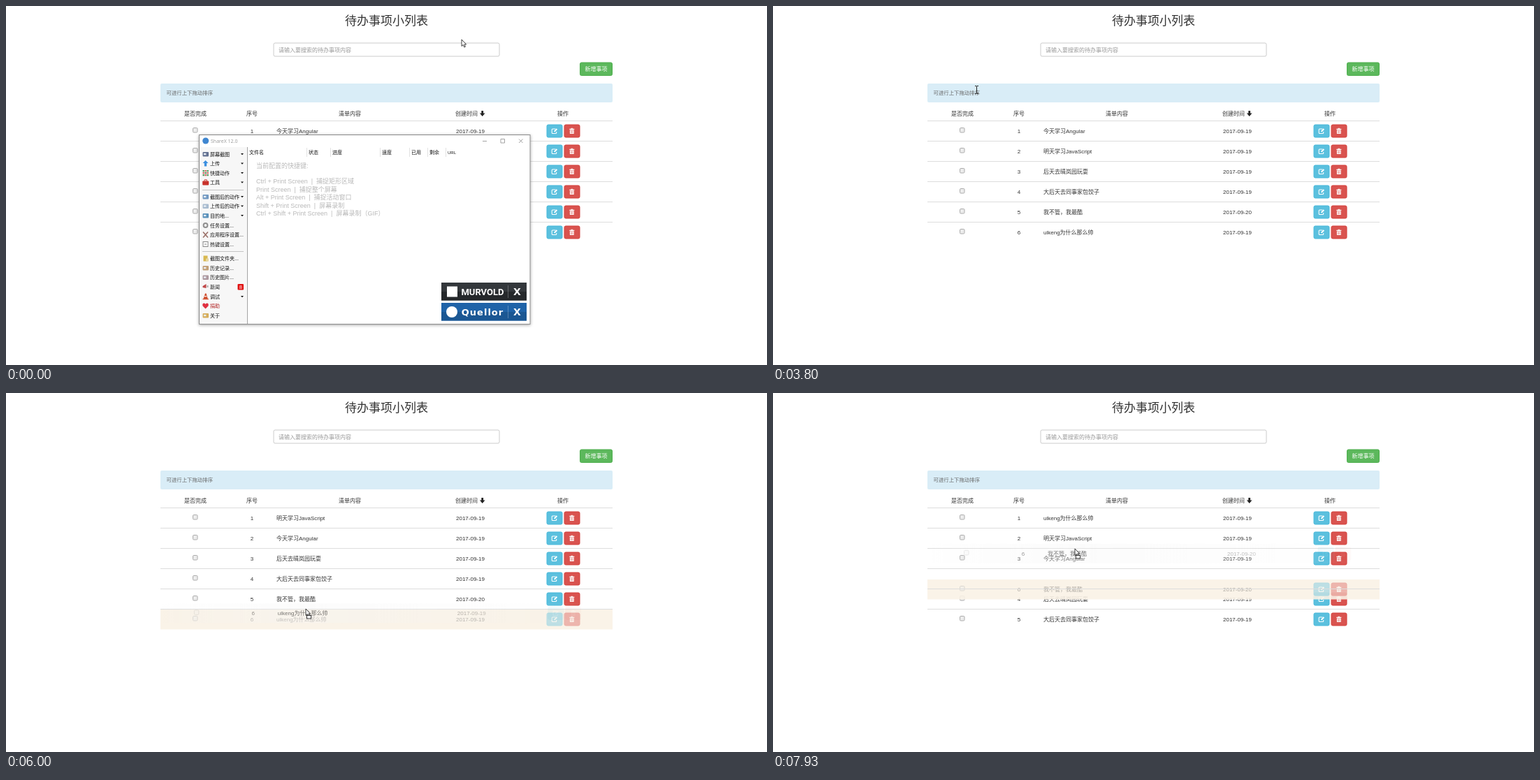
An HTML page that plays this animation: 1089x514 px, repeating every 8 s.

```html
<!DOCTYPE html>
<html>
<head>
<meta charset="utf-8">
<title>待办事项小列表</title>
<style>
html, body { margin: 0; width: 100%; height: 100%; overflow: hidden; background: #fff; }
svg { display: block; }
text { font-family: "Liberation Sans", "Noto Sans CJK SC", "Noto Sans CJK", sans-serif; font-size: 8px; fill: #333; white-space: pre; }
.mid { text-anchor: middle; }
.side text, .cols text { font-size: 7px; fill: #111; }
.keys text { font-size: 9px; fill: #b9b9b9; }
</style>
</head>
<body>
<svg id="stage" width="1089" height="514" viewBox="0 0 1089 514"></svg>
<script>
const LOOP = 8000, STEP = 1000 / 15, TOP = 179, PITCH = 29;

const items = [
  ['今天学习Angular', '2017-09-19'],
  ['明天学习JavaScript', '2017-09-19'],
  ['后天去晴岚园玩耍', '2017-09-19'],
  ['大后天去同事家包饺子', '2017-09-19'],
  ['我不管，我最酷', '2017-09-20'],
  ['ulkeng为什么那么帅', '2017-09-19']
];

// Pointer path: time, x, y
const path = [
  [0, 652, 48], [200, 652, 48], [600, 685, 190], [740, 685, 192], [1066, 692, 520],
  [1935, 692, 520], [1999, 162, 15], [2200, 250, 38], [2400, 336, 88], [2660, 269, 124],
  [3000, 269, 124], [3200, 275, 123], [3530, 262, 123], [3670, 262, 123], [3930, 321, 117],
  [4070, 321, 117], [4130, 325, 117], [4200, 325, 117], [4530, 468, 208], [4730, 445, 179],
  [4800, 445, 179], [5130, 450, 212], [5270, 450, 212], [5667, 426, 321], [5733, 426, 323],
  [5867, 426, 323], [6000, 429, 309], [6330, 437, 190], [6400, 437, 188], [6600, 437, 175],
  [7070, 437, 175], [7530, 426, 323], [7600, 426, 323], [7860, 432, 232], [7933, 432, 223],
  [8000, 432, 210]
];

// Each drag: row, order while it lasts, time span, fractional slot over time
const drags = [
  { id: 0, from: 4860, to: 5260, slot: [[4930, 0], [5080, 1]] },
  { id: 5, from: 5930, to: 6990, slot: [[6130, 5], [6400, 2.41], [6600, 0]], lit: true, over: 6790 },
  { id: 4, from: 7660, to: 9000, slot: [[7730, 5], [7933, 3.52], [8000, 3]] }
];

function at(keys, t) {
  if (t <= keys[0][0]) return keys[0].slice(1);
  for (let i = 1; i < keys.length; i++) {
    const a = keys[i - 1], b = keys[i];
    if (t <= b[0]) {
      const u = (t - a[0]) / (b[0] - a[0]);
      return a.slice(1).map((v, j) => v + (b[j + 1] - v) * u);
    }
  }
  return keys[keys.length - 1].slice(1);
}

const rect = (x, y, w, h, fill, more = '') =>
  `<rect x="${x}" y="${y}" width="${w}" height="${h}" fill="${fill}" ${more}/>`;
const text = (x, y, s, more = '') => `<text x="${x}" y="${y}" ${more}>${s}</text>`;
const line = (d, color, w = 1, more = '') =>
  `<path d="${d}" fill="none" stroke="${color}" stroke-width="${w}" ${more}/>`;

const editIcon = line('M786.5 -3H782.2Q781.2 -3 781.2 -2V2.5Q781.2 3.5 782.2 3.5H786.7Q787.7 3.5 787.7 2.5V1', '#fff', 1.1)
  + line('M784.6 .8L788.4 -3', '#fff', 1.9);
const trashIcon = rect(806.3, -3.2, 7, 1.3, '#fff') + rect(808.4, -4.2, 2.8, 1, '#fff')
  + rect(806.9, -1.4, 5.8, 5.4, '#fff', 'rx=".6"')
  + line('M808.5 -.6V3.2M809.8 -.6V3.2M811.1 -.6V3.2', '#d9534f', .5);

const row = ([name, date], i) => `<g id="wrap${i}"><rect class="bg" x="221" y="-14" width="647" height="28.5"/>
  <g class="cells"><g id="row${i}">
  ${rect(267.5, -4.5, 6.5, 6.5, '#ececec', 'rx="1.3" stroke="#aaa"')}
  ${text(352, 3, i + 1, 'class="mid num"')}${text(387, 3, name)}${text(644, 3, date)}
  ${rect(774, -9, 22, 18, '#5bc0de', 'rx="2" stroke="#46b8da"')}${editIcon}
  ${rect(799, -9, 22, 18, '#d9534f', 'rx="2" stroke="#d43f3a"')}${trashIcon}
  </g></g></g>`;

const page = text(544.5, 27, '待办事项小列表', 'class="mid" style="font-size:17px"')
  + rect(383, 53, 323, 19, '#fff', 'rx="2" stroke="#ccc"')
  + text(390, 65.5, '请输入要搜索的待办事项内容', 'style="fill:#999"')
  + rect(821.5, 81, 46, 18.5, '#5cb85c', 'rx="2" stroke="#4cae4c"')
  + text(844.5, 93.3, '新增事项', 'class="mid" style="fill:#fff"')
  + rect(221, 111, 647, 27, '#d9edf7', 'rx="2"')
  + text(229.5, 127.2, '可进行上下拖动排序', 'style="fill:#666;font-size:7.4px"')
  + [[271, '是否完成'], [352, '序号'], [492, '清单内容'], [659, '创建时间'], [797, '操作']]
    .map(([x, s]) => text(x, 157, s, 'class="mid"')).join('')
  + '<path d="M680.3 150h2.8v3.6h2.4l-3.8 4.4l-3.8 -4.4h2.4z" fill="#222"/>';

// Side menu: label, y, icon colour, has submenu
const menu = [
  ['屏幕截图', 212, '#4a5a80', 1], ['上传', 225.5, '#3b8fe0', 1], ['快捷动作', 239, '#4c9a5a', 1], ['工具', 252.5, '#c8322b', 1],
  ['截图后的动作', 273, '#5a88b8', 1], ['上传后的动作', 286.5, '#9ab0c8', 1], ['目的地...', 300, '#4080b0', 1],
  ['任务设置...', 314, '#909090'], ['应用程序设置...', 327.5, '#9a7068'], ['热键设置...', 341, '#888'],
  ['截图文件夹...', 361.5, '#d8b850'], ['历史记录...', 375, '#b89060'], ['历史图片...', 388.5, '#a08890'],
  ['新闻', 402, '#c04848'], ['调试', 416, '#d05030', 1], ['捐助', 429.5, '#e03040'], ['关于', 443, '#d0a040']
];

function icon(label, y, c) {
  const p = d => `<path d="${d}" fill="${c}"/>`;
  switch (label) {
    case '上传': return p(`M285.5 ${y - 4.5}l4 4h-2.3v4.5h-3.4v-4.5h-2.3z`);
    case '捐助': return p(`M285.5 ${y + 4}l-4 -4q-1 -4 2 -4q1.5 0 2 1.5q.5 -1.5 2 -1.5q3 0 2 4z`);
    case '快捷动作': return [0, 1, 2, 3, 4, 5, 6, 7, 8].map(n =>
      rect(281.5 + n % 3 * 3, y - 4 + (n / 3 | 0) * 3, 2.3, 2.3, n % 2 ? '#d06060' : c)).join('');
    case '任务设置...': return `<circle cx="285.5" cy="${y}" r="2.9" fill="none" stroke="${c}" stroke-width="2"/>`;
    case '应用程序设置...': return line(`M282 ${y - 4}l7 8M289 ${y - 4}l-7 8`, c, 1.6);
    case '热键设置...': return rect(282, y - 3.5, 7, 7, '#fff', `stroke="${c}"`) + line(`M284 ${y}h3`, c);
    case '调试': return p(`M285 ${y - 4.5}h1.5l2.3 7.5h1v1.2h-8.3v-1.2h1z`) + rect(284, y - 1, 3.3, 1.2, '#fff');
    case '工具': return rect(281.2, y - 2, 9, 6, c, 'rx="1"') + line(`M284 ${y - 2}v-1.6h3.4v1.6`, c);
    case '截图文件夹...': return rect(282.5, y - 4, 6, 8, c) + rect(286, y, 4, 4, '#e8d8a0');
    case '新闻': return p(`M281.5 ${y - 1}l5 -3v6l-5 -1z`) + rect(287.5, y - 2, 2, 3, '#b0b0b0');
    default: return rect(281.5, y - 3, 8.5, 6.5, c, 'rx="1" opacity=".85"') + rect(283, y - 1.2, 3.4, 2.4, '#e8eef4');
  }
}

const menuRow = ([s, y, c, sub]) => icon(s, y, c)
  + text(292, y + 2.6, s, s === '捐助' ? 'id="give"' : '')
  + (sub ? `<path d="M336 ${y - 1}h4l-2 2.2z" fill="#111"/>` : '');

const banner = (y, c1, c2, mark, name, font) => rect(623, y, 122, 25.5, c1)
  + rect(623, y + 13, 122, 12.5, c2) + rect(718, y + 4, 1, 18, '#fff', 'opacity=".25"') + mark
  + text(682, y + 17.5, name, `class="mid" style="fill:#fff;font:${font}"`)
  + text(731.5, y + 18, 'X', 'class="mid" style="fill:#fff;font:bold 14px \'DejaVu Sans\',sans-serif"');

const shortcuts = [[228.5, '当前配置的快捷键:'], [251, 'Ctrl + Print Screen  |  捕捉矩形区域'],
  [262.5, 'Print Screen  |  捕捉整个屏幕'], [274, 'Alt + Print Screen  |  捕捉活动窗口'],
  [285.5, 'Shift + Print Screen  |  屏幕录制'], [297, 'Ctrl + Shift + Print Screen  |  屏幕录制（GIF）']];
const columns = [[348, '文件名'], [433, '状态'], [467, '进度'], [538, '速度'], [580, '已用'], [606, '剩余'], [632, 'URL']];

const windowArt = rect(276.5, 184.5, 473.5, 271, '#fff', 'stroke="#8c8c8c" filter="url(#shadow)"')
  + '<circle cx="285.7" cy="193" r="4.5" fill="#3f86d0"/>'
  + text(293, 195.8, 'ShareX 12.0', 'style="fill:#999;font:7px \'Open Sans\',sans-serif"')
  + line('M682 193.5h6M708 190.5h5.5v5.5h-5.5zM734 190.5l5.5 5.5M739.5 190.5l-5.5 5.5', '#999', .9)
  + rect(277, 202, 68, 253, '#f7f7f7') + line('M345.5 202V455', '#a5a5a5')
  + line('M281 263.5H340M281 351.5H340', '#c4c4c4')
  + `<g class="side">${menu.map(menuRow).join('')}</g>`
  + rect(331.5, 398, 8.5, 8.5, '#e01010', 'rx="1"') + text(335.8, 405, '8', 'class="mid" style="fill:#fff;font-size:7.5px"')
  + `<g class="cols">${columns.map(([x, s], i) => text(x, 211.5, s, i === 6 ? 'style="font-size:6px"' : '')
    + (i ? line(`M${x - 3 + .5} 203V216`, '#e2e2e2') : '')).join('')}</g>`
  + `<g class="keys">${shortcuts.map(([y, s]) => text(358, y + 3.4, s)).join('')}</g>`
  + banner(396, '#33373b', '#25282b', rect(631, 401.5, 15, 15, '#fff'), 'MURVOLD', "bold 13px Roboto,sans-serif")
  + banner(425, '#1f63a8', '#1b5793', '<circle cx="638" cy="438" r="8" fill="#fff"/>', 'Quellor',
    "bold 13px 'DejaVu Sans',sans-serif;letter-spacing:1px");

const arrow = '<path d="M0 0V9.5L2.2 7.5L3.8 11L5.4 10.3L3.9 7H6.6Z" fill="#fff" stroke="#111" stroke-width=".8"/>';
const tips = 'l-2 2h4zM0 6l-2 -2h4zM-6 0l2 -2v4zM6 0l-2 -2v4z';
const cursors = {
  arrow,
  drag: arrow + rect(1.5, 9.5, 6, 4.5, '#fff', 'stroke="#222" stroke-width=".9"'),
  beam: line('M-2.5 -5.5H-.6L0 -5L.6 -5.5H2.5M0 -5V5M-2.5 5.5H-.6L0 5L.6 5.5H2.5', '#222', 1),
  move: line('M0 -5V5M-5 0H5', '#333', 3) + line('M0 -5V5M-5 0H5', '#fff', 1.3)
    + `<path d="M0 -6${tips}" fill="#fff" stroke="#222" stroke-width=".8"/>`
};

// Drag image fades away from the grab point
const fade = [[221, .04], [271, .26], [350, .5], [410, .7], [450, .68], [664, .32], [784, .08], [821, .03], [822, 0]]
  .map(([x, o]) => `<stop offset="${(x - 221) / 647}" stop-color="#fff" stop-opacity="${o}"/>`).join('');

const stage = document.getElementById('stage');
stage.innerHTML = `<defs>
  <filter id="shadow" x="-5%" y="-5%" width="110%" height="110%"><feDropShadow dx="0" dy="1" stdDeviation="2" flood-opacity=".35"/></filter>
  <linearGradient id="fade" gradientUnits="userSpaceOnUse" x1="221" x2="868" y1="0" y2="0">${fade}</linearGradient>
  <mask id="veil" maskUnits="userSpaceOnUse" x="221" y="-15" width="647" height="30">${rect(221, -15, 647, 30, 'url(#fade)')}</mask>
  </defs>${page}<g id="rows">${items.map(row).join('')}</g>
  ${line(items.map((_, i) => `M221 ${TOP - 14.5 + i * PITCH}H868`).join(''), '#ddd')}
  <g id="ghost" mask="url(#veil)">${rect(221, -14, 647, 28, '#f5f5f5', 'opacity=".5"')}<use id="copy"/></g>
  <g id="win">${windowArt}</g>
  <g id="cursor">${Object.keys(cursors).map(k => `<g id="c-${k}">${cursors[k]}</g>`).join('')}</g>`;

const $ = id => document.getElementById(id);
const show = (el, on) => el.setAttribute('display', on ? 'inline' : 'none');
const move = (el, x, y) => el.setAttribute('transform', `translate(${x} ${y})`);
const wraps = items.map((_, i) => $('wrap' + i));

function shape(x, y, drag, t) {
  if (drag) return drag.over && t > drag.over ? 'move' : 'drag';
  if (t < 1000 && y < 200) return 'arrow';
  if (y > 164 && y < 338 && x > 221 && x < 868) return 'move';
  if (y > 117 && y < 132 && x > 228 && x < 298) return 'beam';
  return 'arrow';
}

function drawRows(t, x, y) {
  const order = items.map((_, i) => i);
  let drag = null, pos = 0;
  for (const d of drags) {
    if (t < d.from) break;
    const old = order.indexOf(d.id);
    if (t < d.to) {
      drag = d;
      d.start = old;
      order.forEach((id, i) => wraps[id].querySelector('.num').textContent = i + 1);
    }
    pos = at(d.slot, t)[0];
    order.splice(old, 1);
    order.splice(d.id === 0 ? Math.ceil(pos) : Math.floor(pos), 0, d.id);
  }
  const hover = t < 740 || x < 221 || x > 868 ? -1 : Math.floor((y - 165) / PITCH);
  order.forEach((id, i) => {
    const held = drag && drag.id === id, w = wraps[id], bg = w.querySelector('.bg');
    const lit = drag ? drag.lit && i === 5 : i === hover;
    move(w, 0, TOP + PITCH * (held ? pos : i));
    bg.setAttribute('fill', held ? '#faf2e6' : lit ? '#f5f5f5' : 'none');
    bg.setAttribute('opacity', held ? .9 : 1);
    w.querySelector('.cells').setAttribute('opacity', held ? .38 : 1);
    if (!drag) w.querySelector('.num').textContent = i + 1;
  });
  if (drag && $('rows').lastChild !== wraps[drag.id]) $('rows').append(wraps[drag.id]);
  show($('ghost'), drag);
  if (drag) {
    const [x0, y0] = at(path, drag.from - 60), [x1, y1] = at(path, t - 48);
    $('copy').setAttribute('href', '#row' + drag.id);
    move($('ghost'), x1 - x0, TOP + PITCH * drag.start + y1 - y0);
  }
  return drag;
}

function drawWindow(t) {
  const u = Math.min(1, Math.max(0, (t - 660) / 270)), e = u * u, s = 1 - .55 * e;
  show($('win'), u < 1);
  $('win').setAttribute('opacity', 1 - u);
  $('win').setAttribute('transform', `translate(513 ${456 + 70 * e}) scale(${s}) translate(-513 -456)`);
  $('give').style.fill = t < 130 ? '#b02020' : '#8c1c1c';
}

function draw(ms) {
  const t = Math.floor((ms % LOOP + 4) / STEP) * STEP;
  const [x, y] = at(path, t);
  const drag = drawRows(t, x, y);
  drawWindow(t);
  const kind = shape(x, y, drag, t);
  Object.keys(cursors).forEach(k => show($('c-' + k), k === kind));
  move($('cursor'), x, y);
}

const begin = performance.now();
function tick() {
  draw(performance.now() - begin);
  requestAnimationFrame(tick);
}
tick();
</script>
</body>
</html>
```
